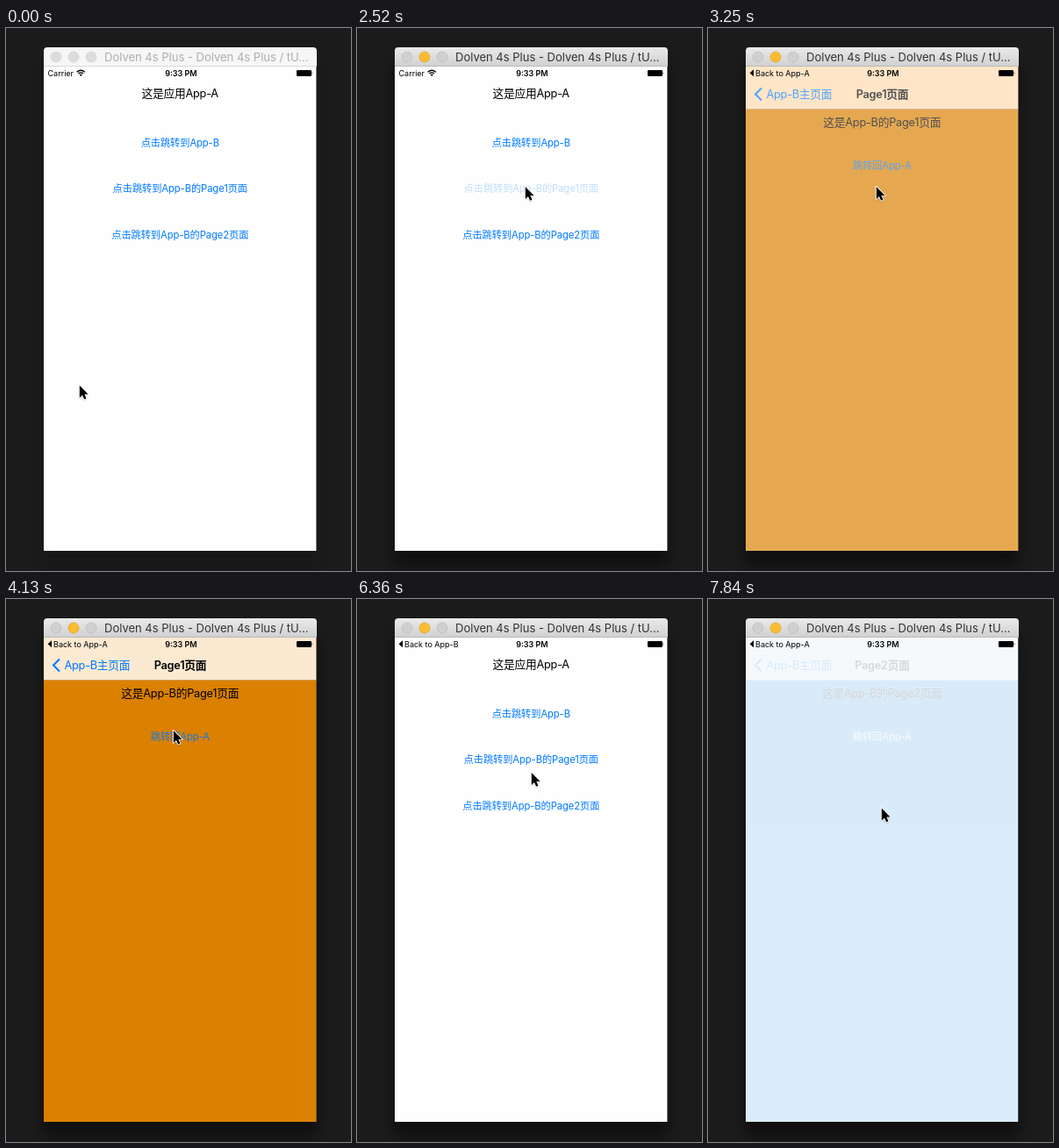
These frames come from a looping animation (393x619 px, 7.99 s). An HTML page:

```html
<!DOCTYPE html>
<html lang="zh-CN">
<head>
<meta charset="utf-8">
<title>App switching demo</title>
<style>
  html, body { margin: 0; width: 100%; height: 100%; overflow: hidden; background: #1b1b1b; }
  svg { display: block; width: 393px; height: 619px; }
  text { font-family: Inter, "Noto Sans CJK SC", "Noto Sans CJK", sans-serif; white-space: pre; }
  .large { font-size: 12.75px; letter-spacing: -.25px; }
  .button { font-size: 11.25px; letter-spacing: -.1px; }
  .status { font-size: 9px; }
  .title { font-size: 13px; }
  .mid { text-anchor: middle; }
  .bold { font-weight: 600; }
  .blue { fill: #007aff; }
</style>
</head>
<body>
<svg id="stage" viewBox="0 0 393 619"></svg>
<script>
const LOOP = 7990, STEP = LOOP / 54, LAST = 53;
const SLIDE = [.16, .71, .93];   // how far a new app has come in, per step
const FADE = [.14, .68, .93];    // its content appearing afterwards

const scenes = [
  { at: -20, page: 'home', back: '' },
  { at: 18, page: 'page1', back: 'App-A' },
  { at: 33, page: 'home', back: 'App-B' },
  { at: 50, page: 'page2', back: 'App-A' }
];
const presses = [['go1', 16, 18], ['ret1', 31, 33], ['go2', 48, 50]];
const cursorStart = [83.5, 407];
const moves = [
  { from: 6, to: 11, x: 191.5, y: 175 },
  { from: 12, to: 15, x: 191.5, y: 180.5 },
  { from: 25, to: 28, x: 190.5, y: 149.5 },
  { from: 40, to: 43, x: 198.5, y: 197.5 },
  { from: 43, to: 47, x: 197.5, y: 238 }
];

const text = (cls, x, y, str, extra = '') =>
  `<text class="${cls}" x="${x}" y="${y}" ${extra}>${str}</text>`;
const box = (fill, extra = '', y = 44, h = 552) =>
  `<rect x="43" y="${y}" width="310.5" height="${h}" fill="${fill}" ${extra}/>`;
const button = (id, y, str, fill = '#007aff') =>
  text('button mid', 198.3, y, str, `id="${id}" fill="${fill}"`);

const homePage = `<g id="home">${box('#fefefe')}
  ${text('large mid', 198.2, 79, '这是应用App-A')}
  ${button('go0', 134.5, '点击跳转到App-B')}
  ${button('go1', 187, '点击跳转到App-B的Page1页面')}
  ${button('go2', 239.5, '点击跳转到App-B的Page2页面')}</g>`;

const innerPage = (n, bg, nav, line, link) => `<g id="page${n}">${box(bg)}
  ${box(nav, `id="nav${n}"`, 44, 48.5)}${box(line, '', 92.2, .6)}
  <path d="M61 68.5L54 75.5L61 82.5" fill="none" stroke="#007aff" stroke-width="2.1"/>
  ${text('large blue', 66.5, 80, 'App-B主页面')}
  ${text('large bold mid', 198.5, 80, `Page${n}页面`)}
  ${text('large mid', 198.3, 112, `这是App-B的Page${n}页面`)}
  ${button('ret' + n, 160.5, '跳转回App-A', link)}</g>`;

const slot = id => `<g id="${id}">${box('#fcfcfc')}<use id="${id}Page"/>
  <g id="${id}Carrier">${text('status', 47.5, 54.8, 'Carrier')}
    <g fill="none" stroke="#000" stroke-width="1.3">
      <path d="M80.6 50.2Q85.2 46.2 89.8 50.2M82.4 52Q85.2 49.6 88 52"/></g>
    <path d="M83.6 53.2Q85.2 52 86.8 53.2L85.2 54.9Z"/></g>
  <g id="${id}Back"><path d="M52 47.3V55.3L47.6 51.3Z"/>
    ${text('status', 54, 54.6, '', `id="${id}Label"`)}</g>
  ${text('status bold mid', 199.4, 54.8, '9:33 PM')}
  <rect x="331" y="48" width="17" height="7" rx="1.2"/>
  <path d="M348.7 50Q350.2 51.5 348.7 53Z"/>
  <rect id="${id}Shade" x="43" y="44" width="310.5" height="552" opacity="0"/></g>`;

const dot = (id, x) => `<circle id="${id}" cx="${x}" cy="33" r="6" stroke-width=".7"/>`;

document.getElementById('stage').innerHTML = `
<defs>
  <linearGradient id="chrome" x2="0" y2="1">
    <stop stop-color="#eaeaea"/><stop offset="1" stop-color="#d0d0d0"/></linearGradient>
  <filter id="soft" x="-20%" y="-20%" width="140%" height="140%"><feGaussianBlur stdDeviation="7"/></filter>
  <filter id="softer" x="-60%" y="-60%" width="220%" height="220%"><feGaussianBlur stdDeviation=".9"/></filter>
  <clipPath id="screen"><rect x="43" y="44" width="310.5" height="552"/></clipPath>
  <path id="arrow" d="M0 0V14.6L3.4 11.5L5.6 16.4L8.1 15.3L5.9 10.5H10.3Z"/>
  ${homePage}
  ${innerPage(1, '#db8000', '#fbe9d2', '#b5915c', '#1279e4')}
  ${innerPage(2, '#0886ea', '#cdeaff', '#8fbbdc', '#fff')}
</defs>
<rect width="393" height="619" fill="#1b1b1b"/>
<rect id="shadow" x="42" y="40" width="313" height="574" rx="8" filter="url(#soft)"/>
<g clip-path="url(#screen)">${box('#000')}${slot('under')}${slot('over')}</g>
<path id="bar" d="M43 44V26Q43 22 47 22H350Q354 22 354 26V44Z"/>
<rect id="edge" x="43" y="43.2" width="311" height=".8"/>
${dot('dotA', 57)}${dot('dotB', 77)}${dot('dotC', 97)}
${text('title', 112, 38, 'Dolven 4s Plus - Dolven 4s Plus / tU...', 'id="caption"')}
<g id="cursor">
  <use href="#arrow" y="1.2" opacity=".35" filter="url(#softer)"/>
  <use href="#arrow" stroke="#fff" stroke-width="1.5" stroke-linejoin="round"/>
  <use href="#arrow" transform="translate(.3 .6) scale(.95)"/>
</g>`;

const els = {};
document.querySelectorAll('[id]').forEach(el => els[el.id] = el);
const set = (id, attrs) => {
  for (const key in attrs) els[id].setAttribute(key, attrs[key]);
};
const show = (id, on) => set(id, { display: on ? 'inline' : 'none' });

function fillSlot(id, scene, fade) {
  set(id + 'Page', { href: '#' + scene.page, opacity: fade });
  show(id + 'Carrier', !scene.back);
  show(id + 'Back', scene.back);
  els[id + 'Label'].textContent = 'Back to ' + scene.back;
}

function drawApps(n) {
  const i = scenes.findLastIndex(s => s.at <= n);
  const k = n - scenes[i].at;
  const p = SLIDE[k] ?? 1;
  const fade = k < 3 ? 0 : FADE[k - 3] ?? 1;
  fillSlot('over', scenes[i], fade);
  set('over', { transform: `translate(${311 * (1 - p)} 0)` });
  set('nav1', { fill: fade > 0 && fade < 1 ? '#ffdaae' : '#fbe9d2' });
  show('under', p < 1);
  if (p < 1) {
    fillSlot('under', scenes[i - 1], 1);
    set('under', { transform: `translate(198.5 320) scale(${1 - .05 * p}) translate(-198.5 -320)` });
    set('underShade', { opacity: p });
  }
  for (const [id, from, to] of presses) {
    set(id, { opacity: n >= from && n < to ? .24 : 1 });
  }
}

function drawWindow(active) {
  const grey = { fill: active ? '#d0d0d0' : '#dcdcdc', stroke: active ? '#bcbcbc' : '#d2d2d2' };
  set('dotA', grey);
  set('dotB', active ? { fill: '#fdbd2f', stroke: '#e0a02a' } : grey);
  set('dotC', grey);
  set('bar', { fill: active ? 'url(#chrome)' : '#f6f6f6' });
  set('edge', { fill: active ? '#b4b4b4' : '#d4d4d4' });
  set('caption', { fill: active ? '#333' : '#aeaeae' });
  set('shadow', { opacity: active ? .4 : .12 });
}

function drawCursor(n) {
  let [x, y] = cursorStart;
  for (const m of moves) {
    const f = Math.min(1, Math.max(0, (n - m.from) / (m.to - m.from)));
    const e = f * (1.6 - .6 * f);
    x += (m.x - x) * e;
    y += (m.y - y) * e;
  }
  set('cursor', { transform: `translate(${x} ${y})` });
}

const start = performance.now();
let drawn = -1;

function frame() {
  const t = (performance.now() - start) % LOOP;
  // the small lead keeps rounded step times on the right side
  const n = Math.min(LAST, Math.floor((t + 16) / STEP));
  if (n !== drawn) {
    drawn = n;
    drawWindow(n >= 2);
    drawApps(n);
    drawCursor(n);
  }
  requestAnimationFrame(frame);
}
frame();
</script>
</body>
</html>
```
